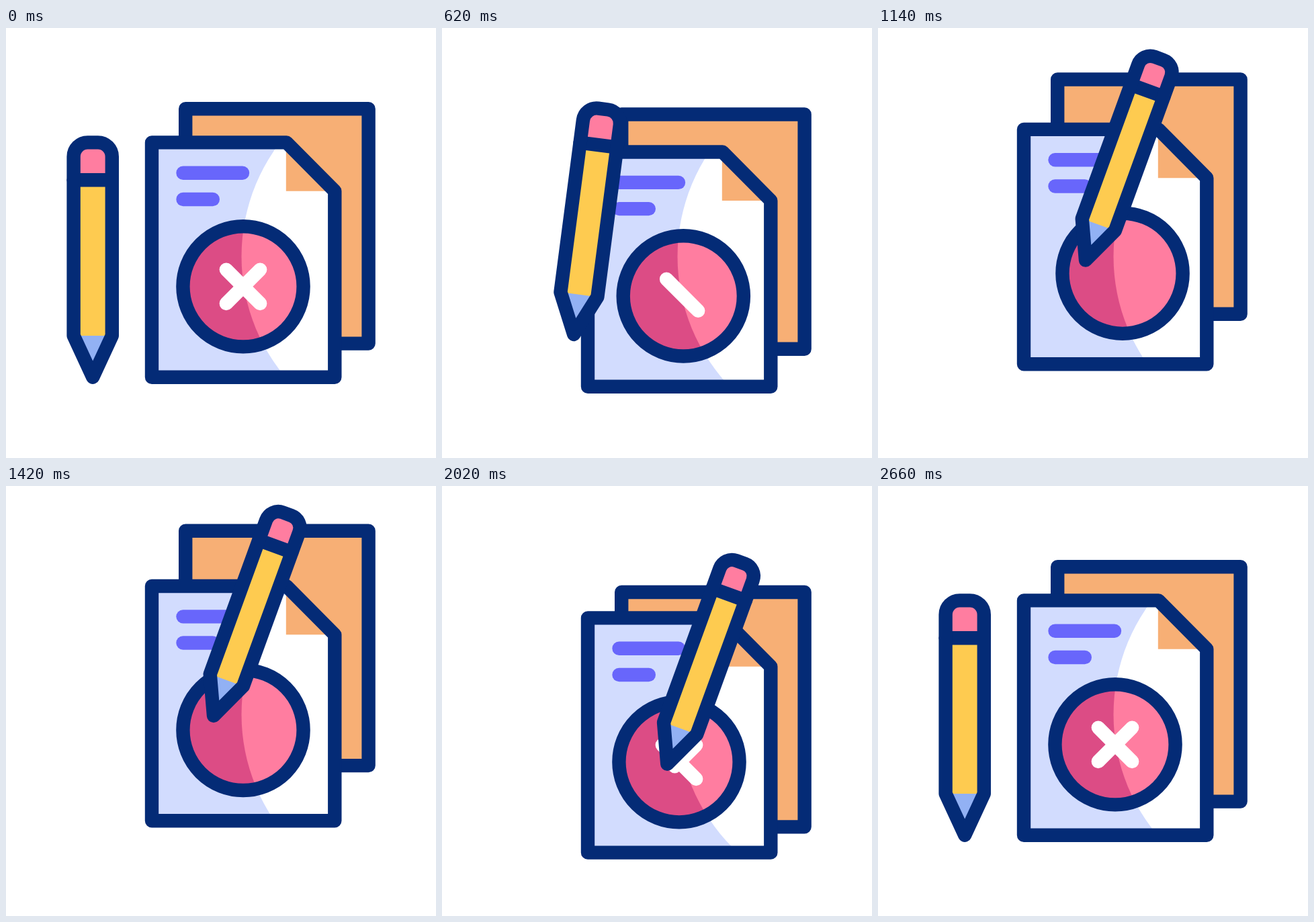
An HTML page with a canvas that plays this animation: 640 px wide and 640 px high, repeating every 3 s.

```html
<!DOCTYPE html>
<html lang="en">
<head>
<meta charset="utf-8">
<title>Rejected document</title>
<style>
  html, body { margin: 0; width: 100%; height: 100%; overflow: hidden; background: #fff; }
  canvas { display: block; width: 640px; height: 640px; }
</style>
</head>
<body>
<canvas id="stage" width="640" height="640"></canvas>
<script>
const ctx = document.getElementById('stage').getContext('2d');
const LOOP = 3000;
const LINE = 20.4;
const TILT = 20 * Math.PI / 180;
const SHRINK = 0.085;
const COLOR = {
  line: '#042b76', paper: '#fff', paperShade: '#d2dcfe', back: '#f7af75',
  bar: '#6866fb', disc: '#ff7da0', discShade: '#dc4c85',
  wood: '#fecb50', lead: '#92b1f4', eraser: '#ff7da0'
};

const smooth = s => s * s * (3 - 2 * s);
const easeOut = s => 1 - (1 - s) ** 2.43;
const earlySmooth = s => smooth(easeOut(s));
const lateSmooth = s => smooth(s * s);

// Poses are [time, value, easing into that value].
function track(...poses) {
  return time => {
    const next = poses.findIndex(pose => pose[0] > time);
    if (next === 0) return poses[0][1];
    if (next < 0) return poses[poses.length - 1][1];
    const [t0, v0] = poses[next - 1];
    const [t1, v1, ease = smooth] = poses[next];
    return v0 + (v1 - v0) * ease((time - t0) / (t1 - t0));
  };
}

const motion = {
  pageY: track([0, 0], [335, 39], [1680, -21.5, earlySmooth], [1893, 39], [2280, -12], [2600, 0]),
  backY: track([40, 0], [440, 39], [1640, -55, easeOut], [1675, -55], [1990, 39], [2350, -20], [2650, 0]),
  discX: track([520, 0], [860, 29.6], [1340, 0]),
  slashUp: track([290, 1], [590, 0], [1880, 0], [2120, 1]),
  slashDown: track([590, 1], [790, 0], [1500, 0], [1810, 1]),
  travel: track([0, 0], [965, 1, lateSmooth], [2130, 1], [2650, 0]),
  writeX: track([1440, 309], [1807, 372], [1880, 372], [2100, 320]),
  writeY: track([965, 348.5], [1350, 342], [1440, 342], [1807, 400.5], [2020, 413.8], [2160, 407])
};

function polygon(...points) {
  const path = new Path2D();
  points.forEach(point => path.lineTo(...point));
  path.closePath();
  return path;
}

function circle(x, y, r) {
  const path = new Path2D();
  path.arc(x, y, r, 0, Math.PI * 2);
  return path;
}

const backSheet = polygon([267.2, 120.3], [539.6, 120.3], [539.6, 469.6], [267.2, 469.6]);
const page = polygon([217, 170.4], [417.5, 170.4], [489.3, 242.8], [489.3, 519.7], [217, 519.7]);
const fold = polygon([416.8, 170.4], [416.8, 242.8], [489.3, 242.8]);
const disc = circle(353, 384.8, 89.6);
const lightArea = circle(630.5, 340, 280);

const TIP = { x: 129.2, y: 519.7 };
const pencil = new Path2D();
pencil.moveTo(TIP.x, TIP.y);
pencil.lineTo(100.6, 458);
pencil.arcTo(100.6, 170.4, 129.2, 170.4, 21);
pencil.arcTo(157.8, 170.4, 157.8, 458, 21);
pencil.lineTo(157.8, 458);
pencil.closePath();

function fill(path, color) {
  ctx.fillStyle = color;
  ctx.fill(path);
}

function outline(path) {
  ctx.strokeStyle = COLOR.line;
  ctx.stroke(path);
}

function segment(x1, y1, x2, y2, color) {
  ctx.strokeStyle = color;
  ctx.beginPath();
  ctx.moveTo(x1, y1);
  ctx.lineTo(x2, y2);
  ctx.stroke();
}

// Runs draw() in a shifted coordinate system.
function shifted(x, y, draw) {
  ctx.save();
  ctx.translate(x, y);
  draw();
  ctx.restore();
}

// Fills a shifted shape in two tones; the border between them stays still.
function fillTwoTone(path, x, y, shade, light) {
  shifted(x, y, () => {
    fill(path, shade);
    ctx.clip(path);
    ctx.translate(-x, -y);
    fill(lightArea, light);
  });
}

function drawBack(y) {
  shifted(0, y, () => {
    fill(backSheet, COLOR.back);
    outline(backSheet);
  });
}

function drawPage(y) {
  fillTwoTone(page, 0, y, COLOR.paperShade, COLOR.paper);
  shifted(0, y, () => {
    fill(fold, COLOR.back);
    outline(page);
    segment(263.5, 215.8, 352, 215.8, COLOR.bar);
    segment(263.5, 255, 307.8, 255, COLOR.bar);
  });
}

function drawDisc(x, y, down, up) {
  const reach = 25.2;
  fillTwoTone(disc, x, y, COLOR.discShade, COLOR.disc);
  shifted(x, y, () => outline(disc));
  shifted(353 + x, 384.8 + y, () => {
    const endDown = reach * (2 * down - 1), endUp = reach * (2 * up - 1);
    if (down > 0) segment(-reach, -reach, endDown, endDown, COLOR.paper);
    if (up > 0) segment(reach, -reach, -endUp, endUp, COLOR.paper);
  });
}

function drawPencil(x, y, travel) {
  const scale = 1 - SHRINK * travel;
  shifted(x, y, () => {
    ctx.rotate(travel * TILT);
    ctx.scale(scale, scale);
    ctx.lineWidth = LINE / scale; // the outline keeps its weight
    ctx.translate(-TIP.x, -TIP.y);
    fill(pencil, COLOR.wood);
    ctx.save();
    ctx.clip(pencil);
    ctx.fillStyle = COLOR.eraser;
    ctx.fillRect(95, 160, 70, 66);
    ctx.fillStyle = COLOR.lead;
    ctx.fillRect(95, 458, 70, 70);
    ctx.restore();
    segment(100.6, 226.2, 157.8, 226.2, COLOR.line);
    outline(pencil);
  });
}

function render(time) {
  const now = {};
  for (const name in motion) now[name] = motion[name](time);

  ctx.fillStyle = '#fff';
  ctx.fillRect(0, 0, 640, 640);
  ctx.lineWidth = LINE;
  ctx.lineCap = ctx.lineJoin = 'round';

  drawBack(now.backY);
  drawPage(now.pageY);
  drawDisc(now.discX, now.pageY, now.slashDown, now.slashUp);
  drawPencil(
    TIP.x + (now.writeX - TIP.x) * now.travel,
    TIP.y + (now.writeY - TIP.y) * now.travel,
    now.travel
  );
}

const start = performance.now();
function frame() {
  render((performance.now() - start) % LOOP);
  requestAnimationFrame(frame);
}
frame();
</script>
</body>
</html>
```
